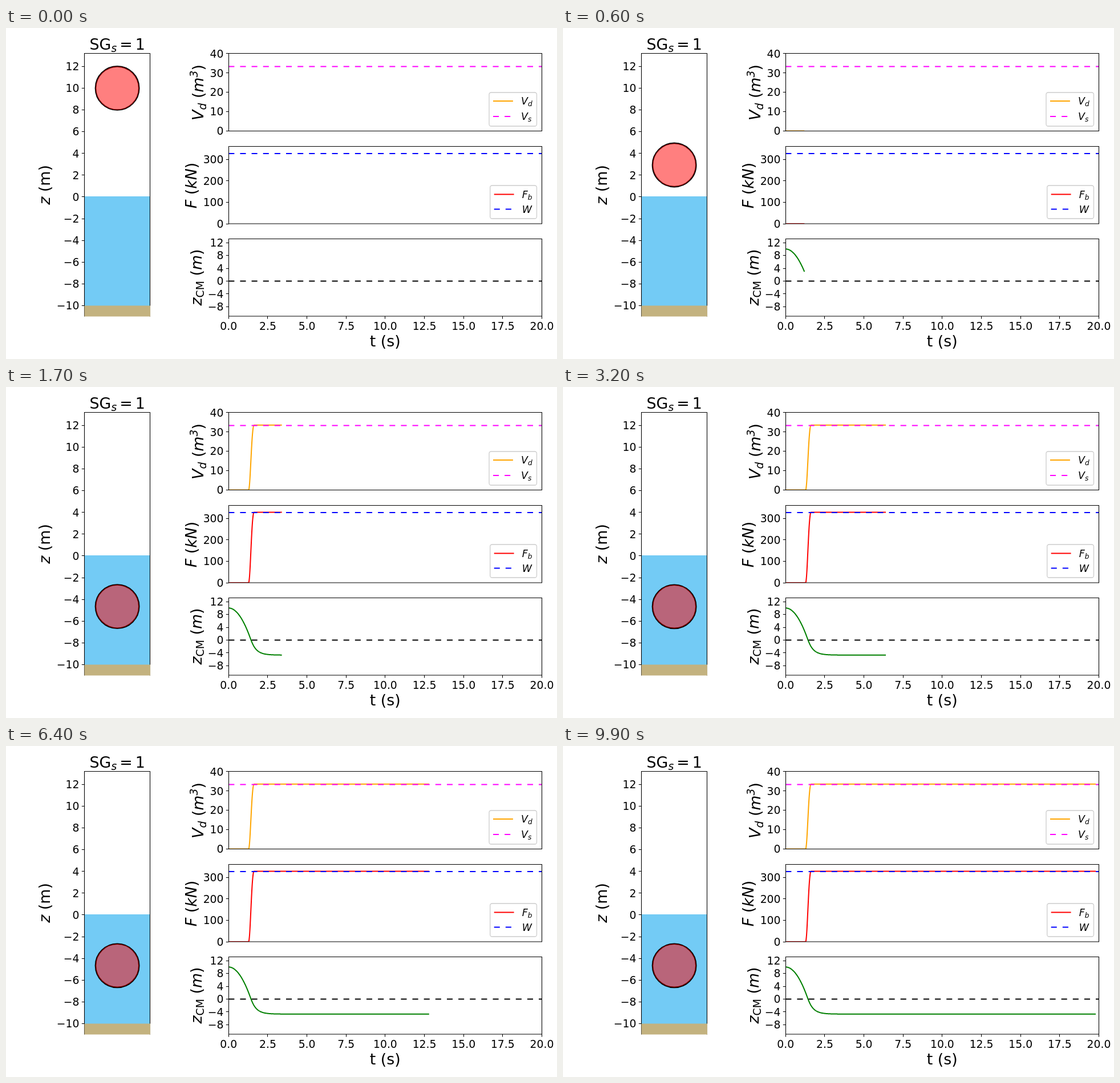
Animation, 966 px wide and 580 px high, one loop 10000 ms. Source, as an HTML page:

```html
<!DOCTYPE html>
<html lang="en">
<head>
<meta charset="utf-8">
<title>Buoyancy of a sphere</title>
<style>
  html, body { margin: 0; width: 100%; height: 100%; overflow: hidden; background: #fff; }
  svg { display: block; width: 966px; height: 580px; }
  text { font: 18.79px "DejaVu Sans", sans-serif; }
  .label { font-size: 26.85px; }
  .key { font-size: 17.45px; }
  .i { font-style: italic; }
  .sub { font-size: 70%; }
  .axis { fill: none; stroke: #000; stroke-width: 1.07; }
  .line { fill: none; stroke-width: 2.01; stroke-linejoin: round; }
  .dash { stroke-dasharray: 10.07 10.07; }
</style>
</head>
<body>
<svg id="stage" viewBox="0 0 966 580"></svg>
<script>
const stage = document.getElementById('stage');
const LEFT = 390.3, RIGHT = 939.5, X_STEP = (RIGHT - LEFT) / 20;
const FRAME = 100, FRAMES = 100, FRAME_TIME = 0.2;

function add(tag, attrs, html = '') {
  const el = document.createElementNS('http://www.w3.org/2000/svg', tag);
  for (const k in attrs) el.setAttribute(k, attrs[k]);
  el.innerHTML = html;
  stage.appendChild(el);
  return el;
}

const text = (x, y, html, cls = '', anchor = 'middle') =>
  add('text', { x, y, class: cls, 'text-anchor': anchor }, html);

const sideLabel = (x, y, html) =>
  add('text', { class: 'label', 'text-anchor': 'middle', transform: `translate(${x} ${y}) rotate(-90)` }, html);

const line = (d, color, cls = '') => add('path', { d, class: 'line ' + cls, stroke: color });
const axis = d => add('path', { d, class: 'axis' });
const it = s => `<tspan class="i">${s}</tspan>`;
const sub = (s, dy, cls = 'i') => `<tspan class="sub ${cls}" dy="${dy}">${s}</tspan>`;

function yTicks(x, from, to, step, toY) {
  for (let v = from; v <= to; v += step) {
    const y = toY(v);
    axis(`M${x} ${Math.round(y - 0.5) + 0.5}h-4.7`);
    text(x - 9, y + 6.8, String(v).replace('-', '−'), '', 'end');
  }
}

const scale = (zero, unit) => v => zero - v * unit;
const tankY = scale(295.96, 19.05);
const volY = scale(180.5, 135.7 / 40);
const forceY = scale(343, 0.376);
const heightY = scale(443.5, 5.62);

// Fall, entry and linear drag scaled by the submerged share.
const G = 9.81, R = 2, DRAG = 3.02, DT = 0.002, KEEP = 10;
const VOLUME = 4 / 3 * Math.PI * R ** 3;

function displaced(z) {
  const h = Math.min(2 * R, Math.max(0, R - z));
  return Math.PI * h * h * (3 * R - h) / 3;
}

function simulate() {
  const path = [];
  let z = 10, v = 0;
  for (let n = 0; n <= 20 / DT; n++) {
    if (n % KEEP === 0) path.push(z);
    const share = displaced(z) / VOLUME;
    const a = -G * (1 - share) - DRAG * share * v;
    z += v * DT + a * DT * DT / 2;
    v += a * DT;
  }
  return path;
}

const heights = simulate();
const PER_FRAME = Math.round(FRAME_TIME / (DT * KEEP));

// Tank
add('rect', { x: 137.8, y: 295, width: 114.4, height: 192, fill: '#73cbf5' });
const rim = add('circle', { cx: 195.1, r: 2 * 19.05, fill: 'none', stroke: '#000', 'stroke-width': 2.6 });
const ball = add('circle', { cx: 195.1, r: 2 * 19.05, fill: '#f00', 'fill-opacity': 0.5 });
axis('M137.5 505.5V44.5H252.5V505.5');
add('rect', { x: 137.5, y: 486.5, width: 115.5, height: 19, fill: '#c3b27f' });
yTicks(137.5, -10, 12, 2, tankY);
text(195.2, 37.5, `SG${sub('s', 4.5)}<tspan dy="-4.5" dx="5">=</tspan><tspan dx="5">1</tspan>`, 'label');
sideLabel(77, 275, it('z') + ' (m)');

// Charts
function chart(top, bottom, toY, value, color, level, levelColor) {
  const id = 'clip' + top;
  add('clipPath', { id }, `<rect x="${LEFT}" y="${top}" width="${RIGHT - LEFT}" height="${bottom - top}"/>`);
  const curve = line('', color);
  curve.setAttribute('clip-path', `url(#${id})`);
  line(`M${LEFT} ${level}H${RIGHT}`, levelColor, 'dash');
  axis(`M390.5 ${top}H939.5V${bottom}H390.5Z`);
  const points = heights.map((z, n) =>
    (LEFT + n * DT * KEEP * X_STEP).toFixed(2) + ' ' + toY(value(z)).toFixed(2));
  return { curve, points };
}

const charts = [
  chart(44.5, 180.5, volY, displaced, '#ffa500', 67.5, '#f0f'),
  chart(207.5, 343, forceY, z => displaced(z) * G, '#f00', 220, '#00f'),
  chart(369.5, 505, heightY, z => z, '#008000', 443.5, '#000')
];

yTicks(390.5, 0, 40, 10, volY);
yTicks(390.5, 0, 300, 100, forceY);
yTicks(390.5, -8, 12, 4, heightY);
for (let t = 0; t <= 20; t += 2.5) {
  const x = LEFT + t * X_STEP;
  axis(`M${Math.round(x - 0.5) + 0.5} 505v4.7`);
  text(x, 529, t.toFixed(1));
}
text(664.8, 558, 't (s)', 'label');

sideLabel(346, 113, `${it('V')}${sub('d', 4.5)}<tspan dy="-4.5"> (</tspan>${it('m')}${sub('3', -10)}<tspan dy="10">)</tspan>`);
sideLabel(334, 276, `${it('F')} (${it('kN')})`);
sideLabel(342.5, 437, `${it('z')}${sub('CM', 4.5, '')}<tspan dy="-4.5"> (</tspan>${it('m')})`);

function legend(x, y, height, rows) {
  add('rect', { x, y, width: 930.5 - x, height, rx: 3.5, fill: '#fff', 'fill-opacity': 0.8, stroke: '#ccc', 'stroke-width': 1.3 });
  for (const [rowY, color, html, cls] of rows) {
    line(`M${x + 7} ${rowY}h34.9`, color, cls);
    text(x + 56, rowY + 6.2, html, 'key', 'start');
  }
}

legend(847, 113, 59, [
  [128, '#ffa500', it('V') + sub('d', 3)],
  [155, '#f0f', it('V') + sub('s', 3), 'dash']
]);
legend(848.7, 276, 58, [
  [291.5, '#f00', it('F') + sub('b', 3)],
  [317.5, '#00f', it('W'), 'dash']
]);

let shown = -1;
function draw(now) {
  const frame = Math.floor(now / FRAME) % FRAMES;
  if (frame !== shown) {
    shown = frame;
    const last = frame * PER_FRAME;
    const y = tankY(heights[last]);
    rim.setAttribute('cy', y);
    ball.setAttribute('cy', y);
    for (const { curve, points } of charts)
      curve.setAttribute('d', last ? 'M' + points.slice(0, last + 1).join('L') : '');
  }
  requestAnimationFrame(draw);
}
draw(performance.now());
</script>
</body>
</html>
```
